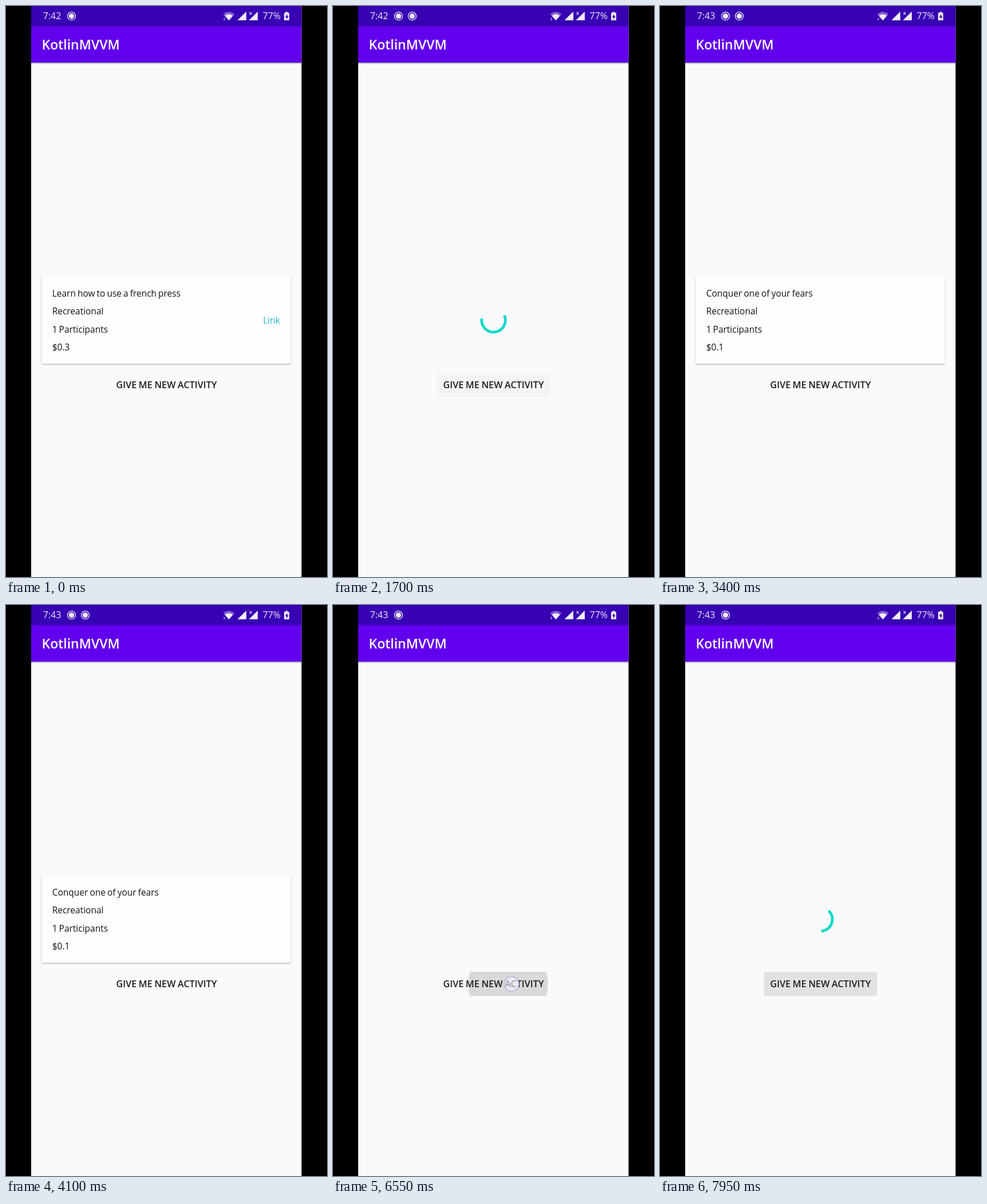
An HTML page that plays this animation: 561x998 px, repeating every 8000 ms.

```html
<!DOCTYPE html>
<html lang="en">
<head>
<meta charset="utf-8">
<title>Activity picker</title>
<style>
html, body { margin: 0; width: 100%; height: 100%; overflow: hidden; background: #000; }
svg { display: block; width: 561px; height: 998px; }
text { font-family: "Open Sans", "Noto Sans", sans-serif; }
.status { font-size: 16px; fill: #f1ecfb; }
.title { font-size: 23px; font-weight: 600; fill: #fff; }
.card text { font-size: 15.5px; word-spacing: -1px; fill: #141216; }
.card .link { fill: #1fb3d3; }
.button { font-size: 16.2px; font-weight: 600; word-spacing: -.6px; fill: #201b20; text-anchor: middle; }
</style>
</head>
<body>
<svg viewBox="0 0 561 998">
  <defs>
    <clipPath id="buttonClip"><rect x="181.5" y="641" width="198" height="42.3" rx="2"/></clipPath>
    <clipPath id="screen"><rect x="44" width="472.5" height="998"/></clipPath>
    <filter id="soft" x="-5%" y="-15%" width="110%" height="130%"><feGaussianBlur stdDeviation="1.2"/></filter>
    <g id="record">
      <circle r="7" fill="none" stroke="#f1ecfb" stroke-width="1.3"/>
      <circle r="4.7" fill="#f1ecfb"/>
    </g>
  </defs>
  <rect width="561" height="998"/>
  <g clip-path="url(#screen)">
    <rect x="44" width="473" height="998" fill="#faf9fc"/>
    <rect x="40" y="94" width="481" height="6.5" fill="#000" opacity=".35" filter="url(#soft)"/>
    <rect x="44" y="35" width="473" height="64" fill="#6200ee"/>
    <rect x="44" width="473" height="35.3" fill="#3700b3"/>
  </g>

  <text class="status" id="clock" x="64.7" y="23.4"></text>
  <use href="#record" x="114.5" y="17.7"/>
  <use href="#record" id="record2" x="138.5" y="17.7"/>
  <g fill="#f1ecfb">
    <path d="M379.5 14.2Q389.500 6.500 399.500 14.200L389.500 25.200Z" opacity=".4"/>
    <path d="M382.500 17Q389.500 11.500 396.500 17L389.500 25.200Z"/>
    <path d="M380 21h3l-1.500 1.700zM380 23.300h3v1.200h-3z" opacity=".8"/>
    <path d="M405 25V24.500L420 9.800V25ZM425 25V24.500L440 9.800V25Z"/>
    <path d="M424 9h7v8h-7z" fill="#3700b3"/>
    <path d="M425.500 10.500l4 5m0-5l-4 5" fill="none" stroke="#f1ecfb" stroke-width="1.200"/>
    <path d="M488.500 10.300h4v1.700h2.500v13h-9V12h2.500z"/>
    <path d="M491.500 14l-3.700 5.200h2.300v4l3.700-5.200h-2.300z" fill="#3700b3"/>
  </g>
  <text class="status" x="448.500" y="23.400">77%</text>
  <text class="title" x="62.500" y="76">KotlinMVVM</text>

  <g class="card" id="card">
    <rect x="62.500" y="473.500" width="435.500" height="153" rx="2" fill="#000" opacity=".36" filter="url(#soft)"/>
    <rect x="62.300" y="472" width="435.900" height="153.500" rx="2" fill="#fefdff"/>
    <g id="lines"></g>
    <text class="link" id="link" x="449.300" y="555">Link</text>
  </g>

  <path id="spinner" fill="none" stroke="#00d9c8" stroke-width="4.600" stroke-linecap="square"/>
  <g clip-path="url(#buttonClip)"><circle id="ripple" cy="662.200"/></g>
  <text class="button" x="280.500" y="668.300">GIVE ME NEW ACTIVITY</text>
  <circle id="touch" cx="312" cy="662.300" r="12.800" fill="#f4f3f8" fill-opacity=".62" stroke="#b9b6da" stroke-opacity=".8" stroke-width="1.800"/>
</svg>
<script>
const LOOP = 8000, STEP = 50;
const CENTER = { x: 280.5, y: 549.3 }, RADIUS = 20.7;

// down: finger lands, load: request starts, done: next card arrives
const taps = [
  { down: 1350, load: 1385, done: 3300 },
  { down: 5000, load: 5032, done: 5300 },
  { down: 6500, load: 6550, done: 6900 },
  { down: 7600, load: 7732, done: LOOP }
];
const cards = [
  { from: 0, name: "Learn how to use a french press", kind: "Recreational", cost: "$0.3", link: true },
  { from: 3300, name: "Conquer one of your fears", kind: "Recreational", cost: "$0.1" },
  { from: 5300, name: "Organize your bookshelf", kind: "Busywork", cost: "$0" },
  { from: 6900, name: "Go for a long walk", kind: "Relaxation", cost: "$0" }
];

const $ = id => document.getElementById(id);
const clamp = v => Math.max(0, Math.min(1, v));
const mix = (a, b, p) => a + (b - a) * p;
const show = (el, on) => { el.style.display = on ? "" : "none"; };

const lines = [0, 1, 2, 3].map(i => {
  const line = document.createElementNS("http://www.w3.org/2000/svg", "text");
  line.setAttribute("x", 80.7);
  line.setAttribute("y", 507.8 + i * 31.5);
  return $("lines").appendChild(line);
});

// Cubic curve from (0,0) to (x3,1), with end handles at y = 0 and y = 1
function curve(x, x1, x2, x3) {
  if (x >= x3) return 1;
  let lo = 0, hi = 1;
  for (let i = 0; i < 24; i++) {
    const s = (lo + hi) / 2, r = 1 - s;
    if (3 * r * r * s * x1 + 3 * r * s * s * x2 + s ** 3 * x3 < x) lo = s; else hi = s;
  }
  return lo * lo * (3 - 2 * lo);
}
const trimEnd = p => 0.75 * curve(p, 0.2, 0.1, 0.5);
const trimStart = p => p < 0.5 ? 0 : 0.75 * curve(p - 0.5, 0.2, 0.1, 0.5);

function point(turn) {
  const a = turn * 2 * Math.PI;
  return (CENTER.x + RADIUS * Math.sin(a)).toFixed(3) + " " + (CENTER.y - RADIUS * Math.cos(a)).toFixed(3);
}

function drawSpinner(age) {
  const p = age % 1333 / 1333;
  const base = age * 2 / 4444 + p * 0.25;
  const start = trimStart(p), end = Math.max(trimEnd(p), start + 0.002);
  const large = end - start > 0.5 ? 1 : 0;
  $("spinner").setAttribute("d",
    `M${point(base + start)}A${RADIUS} ${RADIUS} 0 ${large} 1 ${point(base + end)}`);
}

function drawRipple(t, tap) {
  const p = clamp((t - tap.down - 7) / 225);
  const fade = 1 - clamp((t - tap.load - 170) / 177);
  const ripple = $("ripple");
  ripple.setAttribute("cx", mix(312, 280.5, p));
  ripple.setAttribute("r", mix(62, 102, p));
  ripple.setAttribute("opacity", 0.132 * fade * clamp((t - tap.down) / 50));
}

function render(time) {
  let t = Math.floor(time % LOOP / STEP) * STEP;
  if (t > 2050 && t < 2450) t = 2050;

  const tap = taps.find(a => t >= a.down && t < a.done);
  const loading = !!tap && t >= tap.load;
  const card = cards.filter(c => t >= c.from).pop();

  $("clock").textContent = t < 2450 ? "7:42" : "7:43";
  $("record2").setAttribute("opacity", Math.min(clamp((t - 50) / 400), 1 - clamp((t - 4950) / 200)));

  show($("card"), !loading);
  [card.name, card.kind, "1 Participants", card.cost].forEach((s, i) => { lines[i].textContent = s; });
  show($("link"), card.link);

  show($("spinner"), loading && t > tap.load);
  show($("ripple"), tap);
  show($("touch"), tap && t < tap.load + 50);
  if (loading) drawSpinner(t - tap.load);
  if (tap) drawRipple(t, tap);
}

const begin = performance.now();
function tick() {
  render(performance.now() - begin);
  requestAnimationFrame(tick);
}
tick();
</script>
</body>
</html>
```
